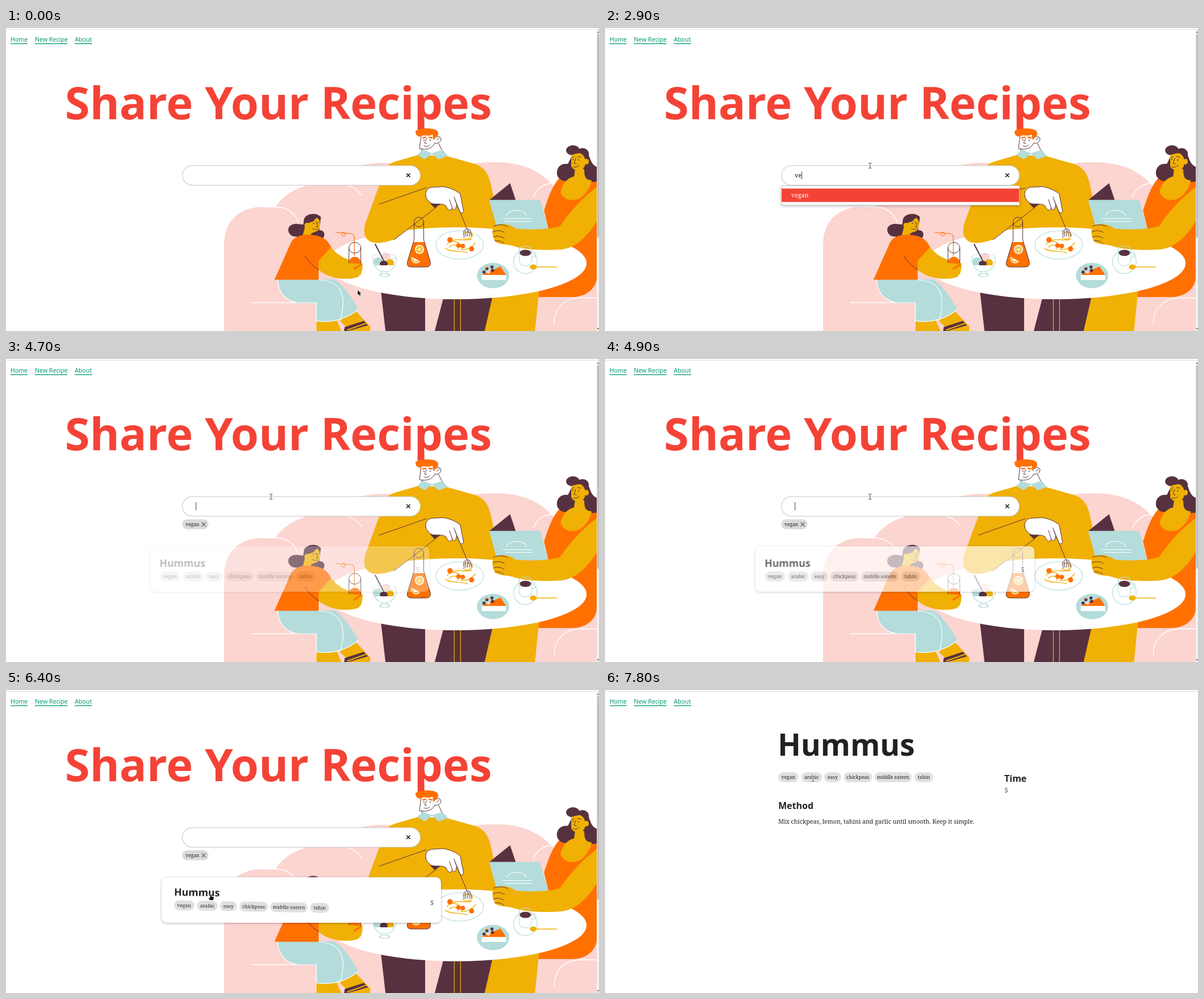
Animation, 1047 px wide and 535 px high, one loop 8 s. Source, as an HTML page with a canvas:

```html
<!DOCTYPE html>
<html lang="en">
<head>
<meta charset="utf-8">
<title>Share Your Recipes</title>
<style>
html, body { margin: 0; width: 100%; height: 100%; overflow: hidden; background: #fff; }
canvas { display: block; width: 1047px; height: 535px; }
</style>
</head>
<body>
<canvas id="stage" width="1047" height="535"></canvas>
<script>
const W = 1047, H = 535, LOOP = 8000;
const stage = document.getElementById('stage').getContext('2d');
const PINK = '#fcd4d0', GOLD = '#f0b004', ORANGE = '#ff7000', DARK = '#573140',
      TEAL = '#b3dcda', RED = '#f44336', GREEN = '#009975', INK = '#212121';
const SERIF = '"Noto Serif", serif', SANS = '"Noto Sans", sans-serif';
const TAGS = ['vegan', 'arabic', 'easy', 'chickpeas', 'middle eatern', 'tahin'];
const TAG_X = [0, 40.5, 81, 115.5, 170, 240.5];
const TAG_W = [35.5, 36.5, 30, 50, 65.5, 33];

let c = stage;

function layer() {
  const el = document.createElement('canvas');
  el.width = W;
  el.height = H;
  return el.getContext('2d');
}
function on(ctx, draw) {
  const old = c;
  c = ctx;
  draw();
  c = old;
}
function fill(color, d) {
  c.fillStyle = color;
  c.fill(new Path2D(d));
}
function line(color, width, d) {
  c.strokeStyle = color;
  c.lineWidth = width;
  c.stroke(new Path2D(d));
}
function oval(color, x, y, rx, ry = rx, stroke = 0) {
  c.beginPath();
  c.ellipse(x, y, rx, ry, 0, 0, Math.PI * 2);
  if (stroke) {
    c.strokeStyle = color;
    c.lineWidth = stroke;
    c.stroke();
  } else {
    c.fillStyle = color;
    c.fill();
  }
}
function round(color, x, y, w, h, r) {
  c.beginPath();
  c.roundRect(x, y, w, h, r);
  c.fillStyle = color;
  c.fill();
}
function text(str, x, y, font, color = INK, align = 'left') {
  c.font = font;
  c.fillStyle = color;
  c.textAlign = align;
  c.fillText(str, x, y);
}
function shadow(color, blur, dy) {
  c.shadowColor = color;
  c.shadowBlur = blur;
  c.shadowOffsetY = dy;
}

// ---------- illustration ----------

function sofa() {
  fill(PINK, 'M385 535V382C385 342 412 316 452 316H476C490 293 520 277 552 274C580 255 620 238 668 238L800 246C820 238 845 237 866 237C910 237 950 252 975 290L1043 330V535Z');
  line('#fff', 1.3, 'M452 316H476C498 316 510 328 516 343M585 274C606 276 619 283 628 296M931 299C937 283 950 274 969 274M433 485H548V535M968 523C968 495 985 477 1015 476.500H1043');
}

function man() {
  fill(GOLD, 'M728 224L690 235C676 239 671 244 667 256L637 338L700 362L866 358L868 330L856 276C851 252 840 243 824 239L778 226Z');
  fill('#fff', 'M735 208L733 217L751 223L771 218L764 203Z');
  line(DARK, 1, 'M735 211L734 217M764 204L771 219');
  fill(TEAL, 'M736 215L726 224L739 232L752 222L764 232L780 226L771 215L752 221Z');
  fill('#fff', 'M734 188L730 213C742 216 753 213 757 203L763 192L755 183Z');
  oval('#fff', 762, 197, 5.5, 6);
  line(DARK, 1, 'M733 190L730 213C744 216 753 212 757 203C762 205 768 201 768 196C767 190 761 191 758 194M743 195L739 203L743 204M738 208C742 210 746 209 748 206M761 198L765 194');
  fill(ORANGE, 'M723 182C730 176 752 176 759 180C765 183 763 189 762 191C758 191 757 195 756 198C753 196 754 190 753 188C745 193 739 187 733 191C727 193 723 189 723 182Z');
  line(ORANGE, 2.5, 'M736 194L741 193M747 193L752 194');
  oval(DARK, 738, 198, 1);
  oval(DARK, 749, 198, 1);
}

// The bent sleeve rests on top of the table.
function elbow() {
  fill(GOLD, 'M660 300L637 338C628 360 633 373 645 378C659 382 675 377 686 373L756 319Z');
}

function woman() {
  fill(ORANGE, 'M976 266C962 282 956 305 950 322L958 356L945 392L940 475H1000C1026 475 1043 458 1043 440V262Z');
  fill(DARK, 'M992 240C975 238 970 253 974 262C980 272 990 271 996 268C1015 263 1026 275 1043 271V245C1034 242 1032 232 1028 222C1020 211 1008 213 1000 224Z');
  oval(DARK, 1001, 216, 12, 9);
  oval(DARK, 1018, 222, 11, 10);
  fill(GOLD, 'M1006 240L1003 262C990 265 983 275 979 290C985 305 1002 307 1014 300C1026 292 1032 280 1034 269C1024 268 1021 264 1021 250Z');
  fill(GOLD, 'M998 224C1005 223 1011 219 1016 222C1024 228 1026 241 1019 248C1011 255 1000 250 998 244Z');
  oval(GOLD, 1025, 236, 4, 5);
  line(DARK, 1, 'M1006 230L1003 239L1007 240M1001 245C1006 247 1010 245 1012 242M999 229L1003 227M1009 227L1015 228');
  oval(DARK, 1001, 232, 1);
  oval(DARK, 1011, 233, 1);
}

function menuCard() {
  fill(DARK, 'M853 304L890 274L900 304Z');
  fill(TEAL, 'M853 303.500H943L957 355L868 358Z');
  line('#fff', 1.2, 'M884 331C887 319 915 319 919 331M877 336.500H929M881 341.500H930');
  fill(GOLD, 'M1043 281C1017 300 995 325 978 350C958 356 925 357 899 354C890 345 871 344 861 350C857 357 859 370 864 377C872 384 888 381 899 386C920 392 950 393 980 391C1008 388 1028 366 1043 341Z');
  line(DARK, 1, 'M861 350C869 346 880 347 886 351M860 360C868 356 875 358 880 361M861 369C868 366 874 368 879 371M863 376C868 375 875 376 879 380');
}

function girl() {
  fill(GOLD, 'M548 512V535H592L583 514ZM588 516L615 497L643 527V535H608Z');
  fill(DARK, 'M598 528L632 517L639 525L604 535H597Z');
  line(GOLD, 2, 'M603 533L637 521');
  fill(TEAL, 'M480 444H580C596 454 614 480 622 497C603 513 575 522 548 518V486H520C496 485 480 468 480 444Z');
  line('#fff', 1.2, 'M480 444C480 468 496 485 520 485H548V517C575 522 603 513 622 497M552 445C588 446 604 467 590 517');
  fill(DARK, 'M526 338C529 327 549 325 556 334L553 357C566 356 565 374 551 375C542 375 541 370 534 367C530 376 515 373 513 368C500 370 494 355 502 349C510 343 518 347 525 347Z');
  fill(GOLD, 'M534 344C541 343 545 338 549 335C556 338 556 353 550 358C544 362 539 360 538 366H524L529 347Z');
  oval(GOLD, 531, 349, 4, 5);
  line(DARK, 1, 'M547 342L551 350L547 351M541 354C545 357 549 356 550 353M540 342L544 340');
  oval(DARK, 543, 345, 1);
  oval(DARK, 551, 344, 0.9);
  fill(ORANGE, 'M504 377C514 363 535 363 550 367C563 370 570 378 574 387L552 413V444.500H474Z');
  fill(GOLD, 'M574 387C584 401 602 411 629 415C631 425 627 436 621 440C601 446 570 443 552 427V411Z');
  line(DARK, 1, 'M528 403C535 414 543 421 552 427');
}

function glass() {
  oval('#fff', 616, 389, 10.5, 10);
  line(ORANGE, 1.2, 'M582 361L609 363Q615 364 615 370V402');
  oval(ORANGE, 596, 364, 3.5, 3.5, 1);
  fill(ORANGE, 'M607 409C612 401 624 403 626 412V421H607Z');
  line(DARK, 1, 'M605.500 388V419M626.500 388V415');
  oval(DARK, 616, 388, 10.5, 9.5, 1);
  fill(GOLD, 'M603 416C610 413 618 419 629 415L627 435L607 434Z');
  line(ORANGE, 3, 'M615 425C620 421 625 420 627 417');
}

function bowl() {
  oval(PINK, 671, 405, 8);
  oval(TEAL, 657, 413, 8);
  oval(GOLD, 678, 415, 7);
  oval(DARK, 667, 416, 7, 5);
  fill('#fff', 'M648 419H689L680 430H656Z');
  line(DARK, 2, 'M652 382L668 413');
  line(TEAL, 1.2, 'M648 405C646 439 691 439 689 405M664 431L660 437M673 431L677 437');
  oval(TEAL, 668, 404, 20.5, 5, 0.7);
  oval(TEAL, 668.5, 436, 9, 2.5, 1.2);
}

function flask() {
  fill(ORANGE, 'M719 378H739L749 412Q751 422 742 422H716Q706 422 709 412Z');
  line(DARK, 1, 'M720.500 343V374L709 412Q706 422 716 422H742Q751 422 749 412L737.500 374V343');
  oval(DARK, 729, 342.5, 8.5, 8.5, 1);
  oval('#fff', 730, 391, 8);
  oval(GOLD, 730, 391, 6.3);
  line('#fff', 1, 'M730 384V398M723 391H737M725 386L735 396M735 386L725 396');
  fill('#fff', 'M716 404L731 412C725 419 714 415 716 404Z');
  line(GOLD, 2, 'M718 407C718 412 722 414 727 412');
}

function pasta() {
  oval('#fff', 801, 383, 42, 25);
  oval(TEAL, 801, 383, 42, 25, 1.1);
  line(GOLD, 1.4, 'M776 389C783 396 806 393 815 397M779 382C785 374 797 376 801 382M783 387C790 379 803 386 797 391M803 390C812 394 824 386 829 379M790 375C800 371 812 377 822 373');
  oval(ORANGE, 784, 374, 4.8);
  oval(ORANGE, 799, 384, 4);
  oval(ORANGE, 806.5, 385, 4);
  oval(ORANGE, 822, 390, 4.5);
  line(GOLD, 1.4, 'M807 370C815 376 824 371 823 363M808 363C814 359 823 360 824 367');
}

function hand() {
  line(DARK, 1, 'M659 311L742 282M685 374L759 317');
  fill(DARK, 'M749 310L757 318L767 311Z');
  const palm = 'M741 296C740 285 747 280 758 281L771 280C786 282 796 288 802 293L808 324Q804 329 801 324L796 312L794 319Q791 323 788 318L785 322Q780 322 777 314C769 308 757 313 750 309Q742 303 741 296Z';
  fill('#fff', palm);
  line(DARK, 1, palm);
  line(DARK, 1, 'M796 312L791 298M788 318L783 303M793 304L814 355M809 369L808 359Q814 351 820 357L822 367M812 368L811 358M815 368V356M819 368L817 357');
}

function sweets() {
  oval(TEAL, 860, 437, 28.5, 22.5);
  fill('#fff', 'M840 436H883V445H840Z');
  fill(ORANGE, 'M840 436L873 421L883 436Z');
  [[844, 431], [849, 425], [858, 422], [852, 431], [859, 428]].forEach(([x, y], i) => {
    oval(i === 3 ? PINK : DARK, x, y, 2.8);
  });
  oval(ORANGE, 848, 423, 1.5);

  oval(TEAL, 917, 413, 21, 20.5, 1.1);
  oval(TEAL, 930, 400, 6, 5, 1.1);
  fill('#fff', 'M906 391V411Q907 420 917 420Q927 420 928 411V391Z');
  line(TEAL, 1.1, 'M906 391V411Q907 420 917 420Q927 420 928 411V391');
  oval(TEAL, 917, 391, 11, 6, 1.1);
  oval(DARK, 917, 397, 10, 5.5);
  line(GOLD, 1.5, 'M932 422H972');
  oval(GOLD, 931, 422, 6, 4.5);
}

function scene() {
  c.lineCap = c.lineJoin = 'round';
  c.beginPath();
  c.rect(0, 0, 1043, H);
  c.clip();
  sofa();
  man();
  woman();
  fill(DARK, 'M662 465L670 535H740V470ZM774 470L757 535H848L860 470Z');
  line(GOLD, 1.2, 'M791.500 476V535M802.500 476V535');
  fill(GOLD, 'M860 470L845 535H934L941 465Z');
  oval('#fff', 795, 415.5, 230, 63.5);
  elbow();
  menuCard();
  girl();
  glass();
  bowl();
  pasta();
  hand();
  flask();
  sweets();
}

const art = layer();
on(art, scene);

// ---------- interface ----------

function cross(x, y, r, color, width) {
  line(color, width, `M${x - r} ${y - r}L${x + r} ${y + r}M${x + r} ${y - r}L${x - r} ${y + r}`);
}

function tagRow(x, y) {
  TAGS.forEach((tag, i) => {
    round('#e0e0e0', x + TAG_X[i], y - 8.7, TAG_W[i], 17.5, 8.75);
    text(tag, x + TAG_X[i] + TAG_W[i] / 2, y + 3, '8.53px ' + SERIF, INK, 'center');
  });
}

function header() {
  c.fillStyle = '#dedede';
  c.fillRect(0, 2, W, 1);
  [['Home', 8, 30], ['New Recipe', 51, 57.5], ['About', 121.5, 30.5]].forEach(([label, x, w]) => {
    text(label, x, 23.6, '10.67px ' + SANS, GREEN);
    c.fillStyle = GREEN;
    c.fillRect(x, 27, w, 1.3);
  });
}

function scrollbar() {
  c.fillStyle = '#f1f1f1';
  c.fillRect(1043, 3, 4, H - 3);
  c.fillStyle = '#c1c1c1';
  c.fillRect(1043.5, 11, 3.5, 359);
  fill('#505050', 'M1043.500 8.500H1047L1045.500 6ZM1043.500 530H1047L1045.500 532.500Z');
}

function search(typed, caret) {
  c.beginPath();
  c.roundRect(311.5, 243, 420, 34.5, 17.25);
  c.fillStyle = '#fff';
  c.fill();
  c.strokeStyle = '#c8c8c8';
  c.lineWidth = 1.1;
  c.stroke();
  cross(710.3, 260, 3.2, '#111', 1.5);
  text(typed, 335, 264, '10.67px ' + SERIF, '#111');
  if (caret) {
    const x = 335 + Math.round(c.measureText(typed).width);
    c.fillStyle = '#444';
    c.fillRect(x, 253, 1, 14);
  }
}

function dropdown(items) {
  const h = 11.4 + items.length * 23.67;
  c.save();
  shadow('rgba(0,0,0,.28)', 5, 1.5);
  c.fillStyle = '#fff';
  c.fillRect(311, 278, 420.5, h);
  c.restore();
  c.strokeStyle = '#cfcfcf';
  c.lineWidth = 1;
  c.strokeRect(311.5, 278.5, 420, h - 1);
  c.fillStyle = RED;
  c.fillRect(312, 283.5, 419, 23.7);
  items.forEach((item, i) => {
    text(item, 329, 299 + i * 23.67, '10.67px ' + SERIF, i ? INK : '#fff');
  });
}

function chosenTag() {
  round('#dadada', 311, 283, 46.5, 17.5, 8.75);
  text('vegan', 317, 295, '8.53px ' + SERIF);
  cross(349, 292, 3.6, '#555', 1.3);
}

const cardLayer = layer();
function card(show, hover) {
  on(cardLayer, () => {
    c.clearRect(0, 0, W, H);
    c.save();
    shadow('rgba(0,0,0,.3)', 4, 1);
    round('#fff', 275, 330.5, 493, 80.5, 9);
    c.restore();
    c.save();
    c.translate(521.5 + 5 * hover, 371);
    c.rotate(hover * Math.PI / 180);
    c.translate(-521.5, -371);
    text('Hummus', 291.6, 367, 'bold 17.78px ' + SANS);
    tagRow(292, 384);
    text('5', 747, 375.5, '10.67px ' + SERIF, INK, 'center');
    c.restore();
  });
  c.globalAlpha = show;
  c.drawImage(cardLayer.canvas, -29 * (1 - show), 0);
  c.globalAlpha = 1;
}

function recipe() {
  text('Hummus', 305, 116, 'bold 53.33px ' + SANS);
  tagRow(306, 154);
  text('Time', 705, 162, 'bold 16px ' + SANS);
  text('5', 705.5, 180.5, '10.67px ' + SERIF);
  text('Method', 306, 210, 'bold 16px ' + SANS);
  text('Mix chickpeas, lemon, tahini and garlic until smooth. Keep it simple.', 306, 236, '10.67px ' + SERIF);
}

// ---------- pointer ----------

const PATH = [
  [100, 621, 463], [200, 629, 455], [400, 575, 365], [600, 494, 273], [700, 480, 260],
  [1200, 480, 260], [1500, 472, 231], [1800, 468, 243], [5500, 468, 243],
  [5800, 425, 300], [6200, 362, 361], [7100, 362, 361], [7300, 457, 207],
  [7500, 457, 207], [7800, 367, 157]
];

function pointerAt(t) {
  const i = PATH.findIndex(p => p[0] > t);
  if (i === 0) return PATH[0].slice(1);
  if (i < 0) return PATH[PATH.length - 1].slice(1);
  const [t0, x0, y0] = PATH[i - 1], [t1, x1, y1] = PATH[i];
  const k = (t - t0) / (t1 - t0);
  return [x0 + (x1 - x0) * k, y0 + (y1 - y0) * k];
}

function pointer(t) {
  const [x, y] = pointerAt(t);
  const home = t < 6800;
  const overText = home ? y >= 243 && y < 278 : t >= 7800;
  const overCard = t > 5500 && t < 7000 && y > 330;
  c.save();
  c.translate(x, y);
  c.lineJoin = 'round';
  if (overText) {
    const beam = 'M-2.500 -4.500H-1L0 -3.700L1 -4.500H2.500M0 -3.700V3.700M-2.500 4.500H-1L0 3.700L1 4.500H2.500';
    line('#fff', 2, beam);
    line('#444', 1, beam);
  } else if (overCard) {
    const palm = 'M-1.500 0H0.500V3.500L4.500 4.500V7.500L3.500 10H-2L-4 6.500L-3 5.500L-1.500 6.500Z';
    line('#fff', 1.4, palm);
    fill('#111', palm);
  } else {
    const arrow = 'M0 0V8.500L2 6.800L3.500 10L5 9.300L3.700 6.300H6.300Z';
    line('#fff', 1.4, arrow);
    fill('#111', arrow);
  }
  c.restore();
}

// ---------- timeline ----------

function typedAt(t) {
  if (t < 2900 || t >= 3800) return '';
  const n = t < 3200 ? 2 : Math.min(5, 3 + Math.floor((t - 3200) / 100));
  return 'vegan'.slice(0, n);
}

function caretAt(t) {
  if (t < 1100) return false;
  const since = t < 2900 ? (t < 2200 ? 1100 : 2200) : t < 3400 ? t : 3400;
  return Math.floor((t - since) / 600) % 2 === 0;
}

const clamp = v => Math.max(0, Math.min(1, v));

function home(t) {
  text('Share Your Recipes', 104, 161, 'bold 79.75px ' + SANS, RED);
  c.drawImage(art.canvas, 0, 0);
  search(typedAt(t), caretAt(t));
  if (t >= 3800) chosenTag();
  if ((t >= 1100 && t < 2900) || (t >= 3800 && t < 4600)) dropdown(TAGS);
  else if (t >= 2900 && t < 3400) dropdown(['vegan']);
  if (t >= 4600) {
    const k = clamp((t - 5900) / 300);
    card(clamp((t - 4540) / 540), k * k * (3 - 2 * k));
  }
  scrollbar();
}

function draw(now) {
  const t = Math.floor(now % LOOP / 100) * 100;
  c.fillStyle = '#fff';
  c.fillRect(0, 0, W, H);
  header();
  if (t < 6800) home(t);
  else recipe();
  pointer(t);
}

let start = null;
function tick(now) {
  if (start === null) start = now;
  draw(now - start);
  requestAnimationFrame(tick);
}
draw(0);
requestAnimationFrame(tick);
</script>
</body>
</html>
```
